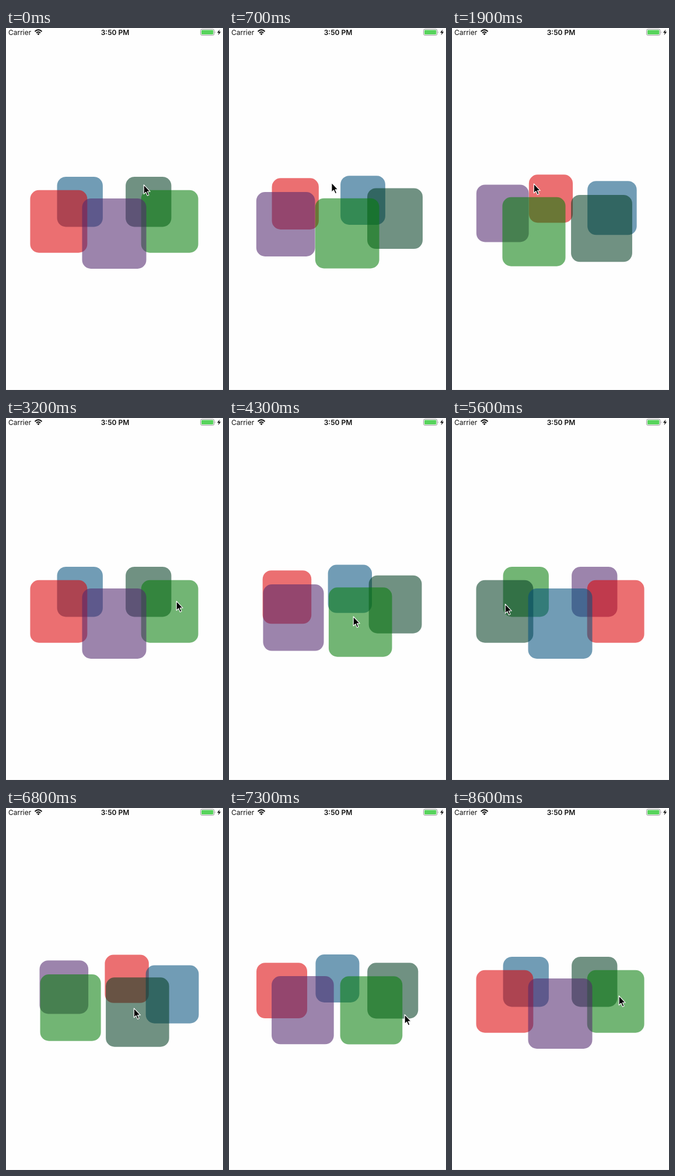
Write an HTML page that moves like this. It is 372 px wide and 618 px high and loops after 8700 ms.

```html
<!DOCTYPE html>
<html lang="en">
<head>
<meta charset="utf-8">
<title>Card carousel</title>
<style>
  html, body { margin: 0; width: 100%; height: 100%; overflow: hidden; background: #fefefe; }
  svg { display: block; width: 372px; height: 618px; }
  text { font: 12px Inter, Roboto, sans-serif; fill: #111; }
  .time { font-weight: 600; text-anchor: middle; }
</style>
</head>
<body>
<svg viewBox="0 0 372 618">
  <rect width="372" height="618" fill="#fefefe"/>
  <rect y="617" width="372" height="1" fill="#f1f1f1"/>

  <text x="4" y="11.5">Carrier</text>
  <g fill="none" stroke="#111" stroke-width="2">
    <path d="M49.5 5.9Q55.5 .4 61.5 5.9"/>
    <path d="M52 8.4Q55.5 5.2 59 8.4"/>
  </g>
  <path d="M53.4 10Q55.5 8.2 57.6 10L55.5 12.2Z" fill="#111"/>
  <text class="time" x="187" y="11.5">3:50 PM</text>

  <rect x="333.5" y="2" width="23.4" height="10.4" rx="2.5" fill="#fff" stroke="#8c8c8c" stroke-width=".9"/>
  <rect x="335" y="3.5" width="20.4" height="7.4" rx="1.1" fill="#57d35c"/>
  <path d="M358 5.4q1.5 1.8 0 3.6z" fill="#8c8c8c"/>
  <path d="M366.3 2.4L362 7.9H364.8L363.7 12.2L368.2 6.4H365.3Z" fill="#111"/>

  <g id="cards"></g>
  <path id="pointer" d="M-.8-.4V15.6L2.8 12.2L5.4 18.2L8 17.1L5.4 11.3H10.2Z"
        fill="#000" stroke="#fff" stroke-width="1.1" stroke-linejoin="round"/>
</svg>
<script>
const LOOP = 8700, STEP = 100;
const CX = 185.5, CY = 321, RX = 100, RY = 30;
const STOP = 72, GAIN = 1.03, SETTLE = 500;

// Front card first, then around the ring
const COLORS = ['#50276d', '#077e0a', '#033e22', '#05507e', '#dd0105'];

// The pointer rests between glides
const HOME = { x: 237, y: 268 };
const GLIDES = [
  { from: 0, to: 1550, x: 96, y: 260 },
  { from: 1550, to: 2600, x: 270, y: 284 },
  { from: 2700, to: 3200, x: 293, y: 313 },
  { from: 3300, to: 4000, x: 220, y: 340 },
  { from: 4200, to: 5000, x: 80, y: 326 },
  { from: 5100, to: 5600, x: 92, y: 318 },
  { from: 5600, to: 5800, x: 127.4, y: 330 },
  { from: 5900, to: 8000, x: 363, y: 361 },
  { from: 8100, to: 8600, x: 287, y: 321 }
];

const DRAGS = [
  { press: 0, release: 2700 },
  { press: 3620, release: 5100 },
  { press: 5900, release: 8100 }
];

const progress = (t, from, to) => Math.min(1, Math.max(0, (t - from) / (to - from)));
const smooth = u => u * u * (3 - 2 * u);

function pointerAt(t) {
  let { x, y } = HOME;
  for (const glide of GLIDES) {
    const u = smooth(progress(t, glide.from, glide.to));
    x += (glide.x - x) * u;
    y += (glide.y - y) * u;
  }
  return { x, y };
}

// The ring follows each drag, then settles at the nearest stop
function turnAt(t) {
  let turn = 0;
  for (const { press, release } of DRAGS) {
    if (t < press) break;
    turn += GAIN * (pointerAt(Math.min(t, release)).x - pointerAt(press).x);
    if (t > release) {
      const rest = Math.round(turn / STOP) * STOP;
      turn = rest + (turn - rest) * (1 - progress(t, release, release + SETTLE)) ** 3;
    }
  }
  return turn;
}

const group = document.getElementById('cards');
const pointer = document.getElementById('pointer');

function set(el, attrs) {
  for (const name in attrs) el.setAttribute(name, attrs[name]);
}

const cards = COLORS.map((fill, i) => {
  const el = document.createElementNS('http://www.w3.org/2000/svg', 'rect');
  set(el, { fill, 'fill-opacity': 0.56, rx: 15 });
  return { el, offset: i * STOP, depth: 0 };
});

function draw(t) {
  const turn = turnAt(t);
  for (const card of cards) {
    const angle = (turn + card.offset) * Math.PI / 180;
    card.depth = Math.cos(angle);
    const width = 92.5 + 17.5 * card.depth, height = width * 12 / 11;
    set(card.el, {
      x: CX + RX * Math.sin(angle) - width / 2,
      y: CY + RY * card.depth - height / 2,
      width, height
    });
  }
  const ordered = [...cards].sort((a, b) => a.depth - b.depth);
  group.replaceChildren(...ordered.map(card => card.el));

  const { x, y } = pointerAt(t);
  set(pointer, { transform: `translate(${x} ${y})` });
}

const start = performance.now();
function tick() {
  const t = (performance.now() - start) % LOOP;
  draw(Math.floor(t / STEP) * STEP);
  requestAnimationFrame(tick);
}
tick();
</script>
</body>
</html>
```
